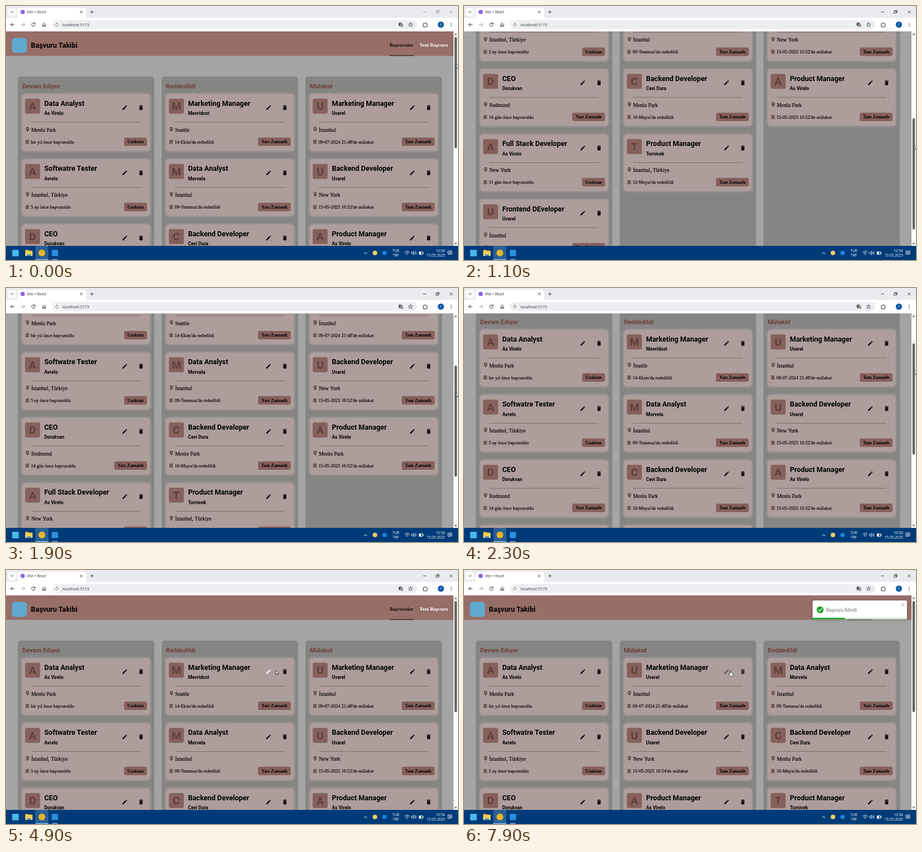
An HTML page that plays this animation: 800x450 px, repeating every 8 s.

```html
<!DOCTYPE html>
<html lang="tr">
<head>
<meta charset="utf-8">
<title>Başvuru Takibi</title>
<style>
html, body { margin: 0; width: 100%; height: 100%; overflow: hidden; background: #fff; }
svg { display: block; width: 800px; height: 450px; }
text { white-space: pre; }
.title { font: 700 12.5px Roboto, sans-serif; }
.firm { font: 700 8.33px Roboto, sans-serif; }
.head { font: 700 11px Roboto, sans-serif; fill: #70403a; }
.letter { font: 700 19px Roboto, sans-serif; fill: #603f3b; text-anchor: middle; }
.place { font: 9.4px "Liberation Serif", serif; stroke: #000; stroke-width: .15px; }
.date { font: 8.3px "Liberation Serif", serif; stroke: #000; stroke-width: .15px; }
.kind { font: 700 8.1px "Liberation Serif", serif; text-anchor: middle; }
.nav { font: 700 8.7px "Liberation Serif", serif; }
.ui { font: 7px "Open Sans", sans-serif; fill: #333; }
.toast { font: 8.33px Roboto, sans-serif; fill: #757575; }
.card { filter: drop-shadow(0 0 2.5px rgba(190, 178, 176, .75)); }
</style>
</head>
<body>
<script>
const NS = 'http://www.w3.org/2000/svg';
function el(parent, tag, attrs = {}, text) {
  const node = document.createElementNS(NS, tag);
  for (const key in attrs) node.setAttribute(key, attrs[key]);
  if (text !== undefined) node.textContent = text;
  return parent.appendChild(node);
}
const rect = (p, x, y, width, height, fill, rx = 0, more = {}) =>
  el(p, 'rect', { x, y, width, height, fill, rx, ...more });
const circle = (p, cx, cy, r, fill) => el(p, 'circle', { cx, cy, r, fill });
const label = (p, x, y, cls, text, more = {}) => el(p, 'text', { x, y, class: cls, ...more }, text);
const line = (p, d, stroke = '#333', width = 1) =>
  el(p, 'path', { d, stroke, 'stroke-width': width, fill: 'none', 'stroke-linecap': 'round', 'stroke-linejoin': 'round' });
const icon = (p, d, x, y, scale, fill = '#120e0e') =>
  el(p, 'path', { d, fill, 'fill-rule': 'evenodd', transform: `translate(${x} ${y}) scale(${scale}) translate(-12 -12)` });
const group = p => el(p, 'g');

const PENCIL = 'M3 17.25V21h3.75L17.81 9.94l-3.75-3.75zM20.71 7.04a1 1 0 0 0 0-1.41l-2.34-2.34a1 1 0 0 0-1.41 0l-1.83 1.83 3.75 3.75z';
const TRASH = 'M6 19a2 2 0 0 0 2 2h8a2 2 0 0 0 2-2V7H6zM19 4h-3.5l-1-1h-5l-1 1H5v2h14z';
const PIN = 'M12 2a7 7 0 0 0-7 7c0 5 7 13 7 13s7-8 7-13a7 7 0 0 0-7-7zm0 10a3 3 0 1 1 0-6 3 3 0 0 1 0 6z';
const CALENDAR = 'M4 4h3V2h3v2h4V2h3v2h3v4H4zM4 9.5h16V22H4zM7 12v2h2.5v-2zM11 12v2h2.5v-2zM15 12v2h2.5v-2zM7 16.5v2h2.5v-2zM11 16.5v2h2.5v-2zM15 16.5v2h2.5v-2z';

// Title, company, place, date, kind of work
const ongoing = [
  ['Data Analyst', 'As Virelo', 'Menlo Park', 'bir yıl önce başvuruldu', 'Uzaktan'],
  ['Softwatre Tester', 'Avrelo', 'İstanbul, Türkiye', '5 ay önce başvuruldu', 'Uzaktan'],
  ['CEO', 'Dorukvan', 'Redmond', '14 gün önce başvuruldu', 'Yarı Zamanlı'],
  ['Full Stack Developer', 'As Virelo', 'New York', '11 gün önce başvuruldu', 'Uzaktan'],
  ['Frontend DEveloper', 'Uvarel', 'İstanbul', '10 gün önce başvuruldu', 'Tam Zamanlı']
];
const rejected = [
  ['Marketing Manager', 'Mevridost', 'Seattle', "14-Ekim'da rededildi", 'Yarı Zamanlı'],
  ['Data Analyst', 'Morvela', 'İstanbul', "09-Temmuz'da rededildi", 'Yarı Zamanlı'],
  ['Backend Developer', 'Cevi Dura', 'Menlo Park', "10-Mayıs'da rededildi", 'Tam Zamanlı'],
  ['Product Manager', 'Tornivek', 'İstanbul, Türkiye', "12-Mayıs'da rededildi", 'Tam Zamanlı']
];
const interviews = clock => [
  ['Marketing Manager', 'Uvarel', 'İstanbul', "09-07-2024 21:48'de mülakat", 'Tam Zamanlı'],
  ['Backend Developer', 'Uvarel', 'New York', `15-05-2025 ${clock}'de mülakat`, 'Tam Zamanlı'],
  ['Product Manager', 'As Virelo', 'Menlo Park', `15-05-2025 ${clock}'de mülakat`, 'Tam Zamanlı']
];

function drawCard(parent, x, y, [title, firm, place, date, kind]) {
  const g = el(parent, 'g', { transform: `translate(${x} ${y})` });
  rect(g, 0, 0, 226.5, 100.5, '#ad9d9b', 5, { class: 'card' });
  rect(g, 5.3, 8.3, 26.5, 26.5, '#86615c', 3);
  label(g, 18.5, 28.3, 'letter', firm[0]);
  label(g, 39.2, 20.5, 'title', title);
  label(g, 39.2, 37, 'firm', firm);
  rect(g, 16, 49.5, 194, .8, '#7d5d59');
  icon(g, PIN, 9.7, 62.5, .42, '#5f423f');
  label(g, 16.2, 66.5, 'place', place);
  icon(g, CALENDAR, 9.2, 84.5, .36, '#5f423f');
  label(g, 15.4, 87.5, 'date', date);
  const width = kind === 'Uzaktan' ? 40.5 : 58;
  rect(g, 221 - width, 77, width, 15, '#86605b', 3);
  label(g, 221 - width / 2, 87.3, 'kind', kind);
  return { pencil: icon(g, PENCIL, 181.7, 24, .46), trash: icon(g, TRASH, 210.5, 24, .46) };
}

function drawBoard(parent, columns) {
  const g = group(parent);
  const hovered = columns.map(([name, cards], i) => {
    const x = 21 + i * 254.5;
    rect(g, x, 125, 241.5, 601, '#868584', 5);
    label(g, x + 7.5, 146, 'head', name);
    return cards.map((card, row) => drawCard(g, x + 7.5, 156 + row * 115.5, card))[0];
  })[1];
  return { g, ...hovered };
}

const svg = el(document.body, 'svg', { viewBox: '0 0 800 450' });
const clip = el(el(svg, 'defs'), 'clipPath', { id: 'view' });
rect(clip, 0, 45, 792, 380, '#000');

// Web page
const view = el(svg, 'g', { 'clip-path': 'url(#view)' });
rect(view, 0, 45, 792, 380, '#a4a4a4');
const page = group(view);
rect(page, 0, 45, 792, 43.3, '#976e68');
rect(page, 10.5, 56.5, 26.5, 26.5, '#5fa9cf', 6);
label(page, 44, 74, 'title', 'Başvuru Takibi');
label(page, 679, 72.3, 'nav', 'Başvurular', { fill: '#160d0c' });
label(page, 732, 72.3, 'nav', 'Yeni Başvuru', { fill: '#fff' });
rect(page, 679, 87.3, 43, 1, '#1a1010');
const boards = [
  drawBoard(page, [['Devam Ediyor', ongoing], ['Reddedildi', rejected], ['Mülakat', interviews('10:52')]]),
  drawBoard(page, [['Devam Ediyor', ongoing], ['Mülakat', interviews('10:54')], ['Reddedildi', rejected.slice(1)]])
];

// Notification
const toast = group(view);
rect(toast, 617, 54, 167, 33.3, '#fff', 2.5, { style: 'filter:drop-shadow(0 1px 2px rgba(0,0,0,.25))' });
circle(toast, 630.3, 70.5, 6, '#189d20');
line(toast, 'M627.5 70.8l2 2 3.7-4.4', '#fff', 1.3);
label(toast, 641, 73.5, 'toast', 'Başvuru Silindi');
line(toast, 'M774.3 59.3l4.4 4.4m0-4.4l-4.4 4.4', '#888', .9);
rect(toast, 617, 84.7, 167, 2.6, '#cdebd0');
const progress = rect(toast, 617, 84.7, 167, 2.6, '#17a620');

// Scrollbar
rect(svg, 792, 45, 8, 380, '#fbfbfb');
el(svg, 'path', { d: 'M793.5 51.5h5l-2.5-3.5zM793.5 419.5h5l-2.5 3.5z', fill: '#777' });
const thumb = rect(svg, 793.8, 55, 4.4, 197, '#656565', 2.2);

// Browser frame
rect(svg, 0, 0, 800, 22, '#e9ebee');
rect(svg, 3, 3, 15, 15, '#f8f9fa', 4);
line(svg, 'M9 9.7l1.8 1.8 1.8-1.8');
rect(svg, 20, 3, 122, 22, '#fff', 5);
rect(svg, 0, 21, 800, 24, '#fff');
circle(svg, 29.5, 10.5, 3.8, '#8a63e6');
label(svg, 37, 13, 'ui', 'Vite + React', { style: 'font-size:6.3px' });
line(svg, 'M131.5 8.8l3.6 3.6m0-3.6l-3.6 3.6M149.5 10.5h5m-2.5-2.5v5', '#333', .9);
const controls = line(svg, 'M738.5 10.5h4.5M785.8 8.3l4.4 4.4m0-4.4l-4.4 4.4M761.5 9.3h3.7v3.7h-3.7zM762.8 9v-1.2h3.6v3.7h-1', '#222', .8);
line(svg, 'M8.5 33h6M11 30.3L8.3 33l2.7 2.7');
line(svg, 'M27 33h6M30.5 30.3l2.7 2.7-2.7 2.7', '#999');
line(svg, 'M51 31.2a3 3 0 1 0 .4 2.6M51.3 29.8v2h-2');
line(svg, 'M65 36v-3.8l2.6-2.2 2.6 2.2V36h-1.8v-2.2h-1.6V36z', '#333', .9);
rect(svg, 82, 25, 646, 16, '#eceef1', 8);
circle(svg, 90, 33, 5.5, '#fff');
line(svg, 'M90 30a3 3 0 1 0 .1 0M90 32.8v1.4M90 31.5v.1', '#444', .7);
label(svg, 100, 35.6, 'ui', 'localhost:5173');
rect(svg, 695, 29.5, 5.5, 6, '#555', 1);
rect(svg, 698, 31.5, 5, 5.5, '#999', 1);
line(svg, 'M716 29.5l1.1 2.3 2.5.3-1.8 1.7.5 2.5-2.3-1.2-2.3 1.2.5-2.5-1.8-1.7 2.5-.3z', '#333', .8);
line(svg, 'M739 31h1.8a1.2 1.2 0 0 1 2.4 0h1.8v1.9a1.1 1.1 0 0 1 0 2.2v1.9h-6z');
circle(svg, 769.7, 33, 5.5, '#0b57a4');
label(svg, 769.7, 35, 'ui', 'F', { style: 'font-size:5.5px;fill:#fff;text-anchor:middle' });
for (const y of [30.5, 33, 35.5]) circle(svg, 788, y, .8, '#333');

// Taskbar
rect(svg, 0, 425, 800, 25, '#003b79');
rect(svg, 52, 425, 23, 25, '#2b5e94');
rect(svg, 11, 432, 11.5, 11.5, '#49b9f0');
rect(svg, 34, 432, 6, 4, '#e2a522', 1);
rect(svg, 34, 433.5, 13, 9.5, '#fbcf55', 1);
rect(svg, 37, 440, 7, 3, '#3f8fd3');
circle(svg, 63.5, 437.5, 6, '#e5b52e');
rect(svg, 81, 432, 11, 11, '#2a8fdc', 1);
rect(svg, 52, 448.5, 23, 1.5, '#76b9ed');
rect(svg, 82, 448.5, 9, 1.5, '#76b9ed');
line(svg, 'M634 439l2.5-2.5 2.5 2.5', '#fff');
circle(svg, 653, 437.5, 4, '#f2ce62');
circle(svg, 670, 437.5, 3.8, '#1687e0');
const tray = (x, y, text, anchor) =>
  label(svg, x, y, 'ui', text, { style: `font-size:6.4px;fill:#fff;text-anchor:${anchor}` });
tray(690, 436, 'TUR', 'middle');
tray(690, 444, 'TRF', 'middle');
tray(777, 436, '10:54', 'end');
tray(777, 444, '15.05.2025', 'end');
line(svg, 'M706 436q4-3.6 8 0M707.6 438q2.4-2.2 4.8 0M709.3 440q.7-.7 1.4 0', '#fff', .9);
line(svg, 'M718 436.3h1.5l2-2v6.4l-2-2H718zM723.3 436q1 1.5 0 3M725 434.6q2 2.9 0 5.8', '#fff', .8);
line(svg, 'M731.5 435.5h6v4.5h-6zM738.6 437v1.5', '#fff', .9);
rect(svg, 731.5, 435.5, 3, 4.5, '#fff');
line(svg, 'M782.5 434h6.5v5.5h-3.5l-1.5 1.5v-1.5h-1.5zM784 436h3.5M784 437.6h3.5', '#fff', .8);

// Pointers
const outline = { fill: '#fff', stroke: '#111', 'stroke-width': .7, 'stroke-linejoin': 'round' };
const arrow = el(svg, 'path', { d: 'M0 0v7l1.6-1.4 1 2.2 1.1-.5-1-2.1h2z', ...outline });
const hand = el(svg, 'path', {
  d: 'M-.8 .8q.8-1.3 1.6 0v3l3 .7q1.2.3 1 1.5l-.5 2.6-.6 1.6h-4l-2.4-3.4q-.1-1.2 1.2-.6l.7.6z', ...outline
});

// Steps of [time, value, ...]
const SCROLL = [[0, 0], [100, 4], [400, 62], [700, 147], [1000, 255], [1150, 285], [1250, 282], [1500, 233], [1900, 157], [2300, 82], [2800, 6], [2900, 0]];
const POINTER = [[2900, 797, 103], [3600, 794, 106], [4000, 690, 135], [4400, 500, 174], [4600, 465, 179], [4800, 468, 179],
  [4900, 477.7, 178], [5100, 489, 178], [5400, 494, 178], [5500, 495, 178.5], [5600, 496, 178.5], [7700, 496, 178.5], [7800, 486, 178], [7900, 471.5, 178]];
const PENCIL_GLOW = [[4500, 0], [4700, 1], [4900, 1], [5200, 0], [7800, 0], [7900, .3]];
const TRASH_GLOW = [[5200, 0], [5600, 1], [7700, 1], [7800, .6], [7900, .14]];
const TOAST_X = [[0, 1560], [420, -13], [525, 5], [630, -2.6], [700, 0]];
const TOAST_START = 5930, TOAST_LIFE = 3000, DELETED = 6000, LOOP = 8000;

const linear = p => p, easeOut = p => 1 - (1 - p) ** 3;
function at(steps, t, ease = linear) {
  const next = steps.findIndex(s => s[0] > t);
  if (next === 0) return steps[0].slice(1);
  if (next < 0) return steps[steps.length - 1].slice(1);
  const a = steps[next - 1], b = steps[next];
  const p = ease((t - a[0]) / (b[0] - a[0]));
  return a.slice(1).map((v, i) => v + (b[i + 1] - v) * p);
}
const move = (node, x, y) => node.setAttribute('transform', `translate(${x} ${y})`);
const show = (node, on) => node.setAttribute('display', on ? 'inline' : 'none');
const glow = amount => {
  const v = Math.round(18 + 237 * amount);
  return `rgb(${v},${v},${v})`;
};

function render(t) {
  const [scroll] = at(SCROLL, t);
  move(page, 0, -scroll);
  thumb.setAttribute('y', 55 + scroll / 1.91);
  controls.setAttribute('stroke', t < 100 ? '#999' : '#222');

  boards.forEach((board, i) => {
    show(board.g, (t >= DELETED) === (i === 1));
    board.pencil.setAttribute('fill', glow(at(PENCIL_GLOW, t)[0]));
    board.trash.setAttribute('fill', glow(at(TRASH_GLOW, t)[0]));
  });

  let [x, y] = at(POINTER, t);
  if (t < 2900) y += scroll / 1.91;
  const clickable = Math.abs(x - 465) < 5 || Math.abs(x - 494) < 4 || t >= 7900;
  show(arrow, !clickable);
  show(hand, clickable);
  move(clickable ? hand : arrow, x, y);

  const age = t - TOAST_START;
  show(toast, age >= 0);
  move(toast, at(TOAST_X, age, easeOut)[0], 0);
  progress.setAttribute('width', 167 * Math.min(1, Math.max(0, 1 - age / TOAST_LIFE)));
}

const start = performance.now();
function tick(now) {
  const t = Math.max(0, now - start) % LOOP;
  render(Math.floor(t / 100) * 100);
  requestAnimationFrame(tick);
}
render(0);
requestAnimationFrame(tick);
</script>
</body>
</html>
```
